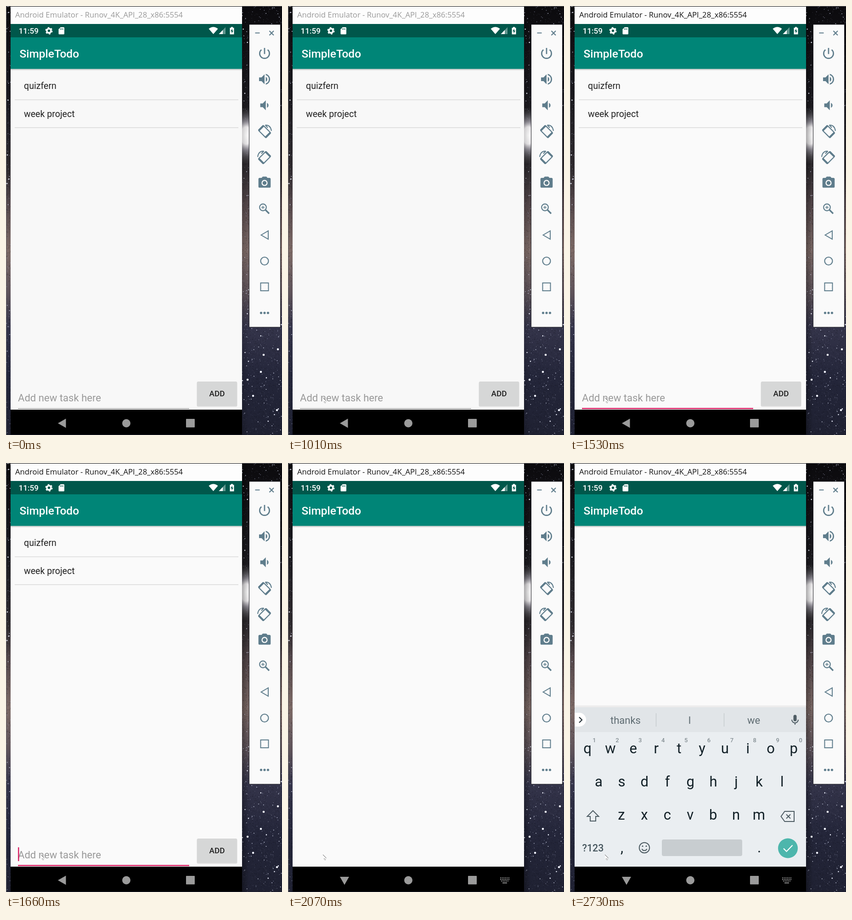
Write an HTML page that moves like this. It is 601x931 px and loops after 8 s.

```html
<!DOCTYPE html>
<html lang="en">
<head>
<meta charset="utf-8">
<title>Todo app in an emulator</title>
<style>
html, body { margin: 0; width: 100%; height: 100%; overflow: hidden; background: #08080c; }
svg { display: block; width: 100vw; height: 100vh; }
text { font-family: Roboto, Arial, sans-serif; white-space: pre; }
.mid { text-anchor: middle; }
.bold { font-weight: 500; }
.line { fill: none; stroke-width: 2.2; }
#title { font: 16.7px "Open Sans", "Noto Sans", sans-serif; }
</style>
</head>
<body>
<svg viewBox="0 0 601 931" xmlns="http://www.w3.org/2000/svg">
  <defs>
    <linearGradient id="sky" x2="0" y2="1">
      <stop offset="0" stop-color="#0b0a0d"/>
      <stop offset=".2" stop-color="#19181d"/>
      <stop offset=".38" stop-color="#2e2a2e"/>
      <stop offset=".46" stop-color="#54474a"/>
      <stop offset=".57" stop-color="#7d6a66"/>
      <stop offset=".67" stop-color="#5d5259"/>
      <stop offset=".75" stop-color="#34344a"/>
      <stop offset=".86" stop-color="#24263a"/>
      <stop offset="1" stop-color="#1f2132"/>
    </linearGradient>
    <radialGradient id="glow">
      <stop offset="0" stop-color="#fff"/>
      <stop offset=".3" stop-color="#f0eef0"/>
      <stop offset=".5" stop-color="#a5a2ac" stop-opacity=".8"/>
      <stop offset="1" stop-color="#555" stop-opacity="0"/>
    </radialGradient>
    <linearGradient id="side">
      <stop offset="0" stop-color="#000" stop-opacity=".3"/>
      <stop offset="1" stop-color="#000" stop-opacity="0"/>
    </linearGradient>
    <linearGradient id="drop" x2="0" y2="1">
      <stop offset="0" stop-color="#000" stop-opacity=".22"/>
      <stop offset="1" stop-color="#000" stop-opacity="0"/>
    </linearGradient>
    <clipPath id="screen"><path d="M10 39H514V930H10z"/></clipPath>
  </defs>

  <rect width="601" height="931" fill="url(#sky)"/>
  <g id="stars" stroke-linecap="round" fill="none"></g>
  <ellipse cx="523" cy="281" rx="40" ry="62" fill="url(#glow)"/>
  <rect id="shade" x="514" width="15" height="930" fill="url(#side)"/>
  <path d="M.5 931V.5H601" fill="none" stroke="#77777a"/>

  <!-- emulator window -->
  <path d="M10 0H514V930H10z" fill="#000"/>
  <path d="M10 1H514V39H10z" fill="#fdfdfd"/>
  <text id="title" x="20" y="25">Android Emulator - Runov_4K_API_28_x86:5554</text>

  <g clip-path="url(#screen)">
    <rect id="page" x="10" y="39" width="504" height="891"/>
    <g id="content">
      <g font-size="19.6" fill="#222">
        <text x="39" y="180">quizfern</text>
        <text x="39" y="240.500">week project</text>
      </g>
      <path d="M19 203.500H506M19 264H506" stroke="#d9d9d9" stroke-width="1.600"/>
      <text x="26" y="858" font-size="22.100" fill="#999">Add new task here</text>
      <path id="rule" d="M26 873.500H399"/>
      <path id="caret" d="M27.300 834V864" stroke="#d81b60" stroke-width="2.400"/>
      <rect x="415.500" y="815.500" width="88" height="54" rx="3" fill="#000" opacity=".13"/>
      <rect x="416" y="815" width="87" height="52" rx="2.500" fill="#d6d7d7"/>
      <text class="mid bold" x="459.500" y="847" font-size="17.200" fill="#1f1f1f">ADD</text>
    </g>

    <g id="keyboard">
      <rect x="10" y="526" width="504" height="4" fill="#000" opacity=".05"/>
      <path d="M10 530H514V584H10z" fill="#e1e5e8"/>
      <path d="M10 584H514V940H10z" fill="#eaeef1"/>
      <path d="M10 542H20a15 15 0 0 1 0 30H10z" fill="#fff"/>
      <path d="M20 551.500l6 6-6 6" class="line" stroke="#263238"/>
      <path d="M187.500 543V572M335.500 543V572" stroke="#c3c9cc" stroke-width="1.300"/>
      <g class="mid" font-size="22" fill="#5f6c72">
        <text x="121" y="566">thanks</text><text x="260.500" y="566">I</text><text x="400" y="566">we</text>
      </g>
      <g stroke="#4f5d64" fill="none" stroke-width="2">
        <rect x="487.500" y="547.500" width="5" height="12" rx="2.500" fill="#4f5d64"/>
        <path d="M483 557a7 7 0 0 0 14 0M490 564V568"/>
        <path d="M50 754.500L62.500 767H56V777H44V767H37.500z"/>
        <path d="M467.500 756H488V778H467.500L459.500 767zM471 762.500l9 9M480 762.500l-9 9"/>
        <circle cx="162" cy="835" r="11.200"/>
        <path d="M156.500 837.500a6 6 0 0 0 11 0"/>
        <path d="M158 831.500h.1M166 831.500h.1" stroke-width="3.200" stroke-linecap="round"/>
      </g>
      <g id="keys" class="mid" font-size="31" fill="#122027"></g>
      <g id="hints" class="mid bold" font-size="13" fill="#858f94"></g>
      <text class="mid bold" x="50" y="843" font-size="21.500" fill="#46565e">?123</text>
      <rect x="200" y="817" width="175" height="36" rx="4" fill="#c8cdd0"/>
      <circle cx="474.500" cy="836" r="21.500" fill="#4db6ac"/>
      <path d="M465 836.500l6.500 6.500 13-13.500" class="line" stroke="#fff"/>
    </g>

    <!-- bars -->
    <path d="M10 39H514V68H10z" fill="#00574b"/>
    <path d="M10 68H514V136.500H10z" fill="#008577"/>
    <rect x="10" y="136.500" width="504" height="4" fill="url(#drop)"/>
    <text class="bold" x="27.500" y="60" font-size="17.200" fill="#fff">11:59</text>
    <text class="bold" x="29.400" y="112" font-size="24.500" fill="#fff">SimpleTodo</text>
    <g fill="#fff">
      <circle cx="93.500" cy="53.800" r="4.500" fill="none" stroke="#fff" stroke-width="3.600"/>
      <circle cx="93.500" cy="53.800" r="6.500" fill="none" stroke="#fff" stroke-width="3" stroke-dasharray="3.403"/>
      <path d="M119 46H125.500Q127 46 127 47.500V60Q127 61.500 125.500 61.500H116Q114.500 61.500 114.500 60V50.500z"/>
      <path d="M118.500 48.500v3M121.300 48.500v3M124 48.500v3" stroke="#00574b" stroke-width="1.300"/>
      <path d="M441.500 49.500Q451.500 41.500 461.500 49.500L451.500 61z"/>
      <path d="M478 46V61H463.500z" opacity=".38"/>
      <path d="M472 52.300V61H463.500z"/>
      <path d="M490 45.500h4v1.800h2.500V61.500H487.500V47.300H490z"/>
      <path d="M492.700 49l-3.500 6h2.300v4.500l3.500-6h-2.300z" fill="#00574b"/>
    </g>

    <rect id="nav" x="10" y="876" width="504" height="54" fill="#000"/>
    <g id="buttons">
      <path id="back" d="M113 905.500L130.500 895.500V915.500z"/>
      <circle cx="262" cy="905.500" r="9"/>
      <rect x="392" y="896" width="19" height="18.500" rx="1"/>
      <g id="switch" stroke-width="1.900" fill="none">
        <path d="M462 900.500H482M462 904H482M464 907.300H480" stroke-dasharray="2.100 1.500"/>
        <path d="M467 911.300H477"/>
      </g>
    </g>
  </g>

  <!-- side toolbar -->
  <path d="M529.500 40H597.500V697H529.500z" fill="#fafafa" stroke="#1a1a20"/>
  <g id="tools" fill="#5f7d8c" stroke="#5f7d8c" stroke-width="0">
    <path d="M542.500 58.500H552.500M573.500 54l9.500 9.500M583 54l-9.500 9.500" class="line" stroke-width="1.700"/>
    <g id="turn" class="line">
      <g transform="translate(563 272.500) rotate(45)">
        <rect x="-11.500" y="-7.500" width="23" height="15" rx="1.500"/>
        <path d="M-10.500 -7.500V7.500M10.500 -7.500V7.500" stroke-width="4"/>
      </g>
      <path d="M564.500 258.500Q576 257.500 578 271M570 264l-5.500-5.700" stroke-width="2"/>
    </g>
    <use href="#turn" transform="matrix(-1 0 0 1 1126 56.500)"/>
    <circle cx="563" cy="384" r="4.300"/>
    <g class="line">
      <circle cx="559.500" cy="437" r="7.300"/>
      <path d="M556 437h7M559.500 433.500v7" stroke-width="1.600"/>
      <path d="M565 442.500l8 8" stroke-width="3.200"/>
      <path d="M555.500 497L571 488V506z" stroke-width="2"/>
      <circle cx="563" cy="553.500" r="8.500"/>
      <rect x="554.500" y="601" width="17" height="17" stroke-width="2"/>
    </g>
    <circle cx="555.500" cy="666" r="2.600"/><circle cx="563" cy="666" r="2.600"/><circle cx="570.500" cy="666" r="2.600"/>
  </g>

  <g id="cursor">
    <path d="M0 0V10L2 8.500 4 12 6.500 11 5 7.500H8z" fill="#fbfbfb"/>
    <path d="M0 0L7.500 7.500" stroke="#555"/>
    <path d="M2 8.500l3 .2 1.200 2.300-2 .8z" fill="none" stroke="#999" stroke-width=".8"/>
  </g>
</svg>
<script>
const $ = id => document.getElementById(id);
const set = (node, attrs) => {
  for (const key in attrs) node.setAttribute(key, attrs[key]);
};
const add = (parent, name, attrs, text) => {
  const node = document.createElementNS("http://www.w3.org/2000/svg", name);
  set(node, attrs);
  if (text) node.textContent = text;
  return parent.appendChild(node);
};
const show = (id, on) => set($(id), { visibility: on ? "visible" : "hidden" });

// Toolbar icons on a 24-unit grid
const icon = (y, d) => add($("tools"), "path", {
  d, "fill-rule": "evenodd", transform: `translate(563 ${y}) scale(1.33) translate(-12 -12)`
});
icon(103, "M13 3h-2v10h2zM17.8 5.2l-1.400 1.400A7 7 0 1 1 7.600 6.600L6.200 5.200A9 9 0 1 0 17.800 5.200z");
icon(159, "M3 9v6h4l5 5V4L7 9zM16.500 12A4.500 4.500 0 0 0 14 8v8a4.500 4.500 0 0 0 2.500-4zM14 3.200v2.100a7 7 0 0 1 0 13.400v2.100a9 9 0 0 0 0-17.600z");
icon(215.5, "M18.500 12A4.500 4.500 0 0 0 16 8v8a4.500 4.500 0 0 0 2.500-4zM5 9v6h4l5 5V4L9 9z");
icon(383, "M9 2.500L7.200 4.500H4Q2 4.500 2 6.500V18.500Q2 20.500 4 20.500H20Q22 20.500 22 18.500V6.500Q22 4.500 20 4.500H16.800L15 2.500zM12 7.700a5 5 0 1 1 0 10a5 5 0 1 1 0-10z");

// Keyboard letters
const row = (chars, x, y, step = 49.9, parent = $("keys")) =>
  [...chars].forEach((c, i) => add(parent, "text", { x: x + i * step, y }, c));
row("qwertyuiop", 38, 630);
row("asdfghjkl", 62.5, 702);
row("zxcvbnm", 112, 774);
row(",.", 113, 845, 299);
row("1234567890", 53, 606, 49.9, $("hints"));

// Stars in the strips around the window
let seed = 11;
const rand = () => (seed = seed * 16807 % 2147483647) / 2147483647;
const starGroup = (count, width, color) => {
  let d = "";
  for (let i = 0; i < count; i++) {
    const u = rand() * 97;
    d += `M${(u < 10 ? u : u + 504).toFixed(1)} ${(rand() * 931).toFixed(1)}h.01`;
  }
  add($("stars"), "path", { d, stroke: color, "stroke-width": width });
};
starGroup(3000, 1.5, "#0c0c1455");
starGroup(1600, 1.2, "#6a6c8066");
starGroup(420, 1.3, "#8c90a8");
starGroup(150, 1.8, "#c4c8dc");
starGroup(40, 2.6, "#eceffc");
add($("stars"), "path", {
  d: "M555 794h.1M561 757h.1M592 745h.1M526 811h.1M590 877h.1M538 846h.1",
  stroke: "#f4f6ff", "stroke-width": 4.5
});

// Pointer stops: time, x, y
const stops = [[500, 128, 901], [620, 99, 895], [770, 93, 883], [890, 84, 865], [1010, 76, 850]];

function draw(t) {
  const active = t >= 1410;
  const focus = t >= 1530;
  const typing = t >= 1940;
  const turned = t >= 2070;
  const sliding = t >= 2580 && t < 2730;

  set($("title"), { fill: active ? "#111" : "#999" });
  set($("page"), { fill: active ? "#fafafa" : "#f8f8f8" });
  set($("shade"), { opacity: active ? 1 : .5 });

  show("content", !typing);
  show("caret", t >= 1660 && !typing);
  set($("rule"), { stroke: focus ? "#d81b60" : "#7c7c7c", "stroke-width": focus ? 2.5 : 1.2 });

  show("keyboard", t >= 2580);
  set($("keyboard"), { transform: `translate(0 ${sliding ? 52.6 : 0})`, opacity: sliding ? .64 : 1 });

  const angle = turned ? -90 : typing ? -45 : 0;
  set($("nav"), { opacity: sliding ? .45 : 1 });
  set($("buttons"), { fill: sliding ? "#d6d6d6" : "#9b9b9b" });
  set($("back"), { transform: `translate(${turned ? "1 1" : "0 0"}) rotate(${angle} 122 905.5)` });
  set($("switch"), { stroke: sliding ? "#d0d0d0" : "#9b9b9b", opacity: turned ? 1 : .5 });
  show("switch", typing);

  const stop = stops.filter(s => s[0] <= t).pop();
  show("cursor", stop);
  if (stop) set($("cursor"), { transform: `translate(${stop[1]} ${stop[2]})` });
}

let start;
function tick(now) {
  start ??= now;
  draw((now - start) % 8000);
  requestAnimationFrame(tick);
}
draw(0);
requestAnimationFrame(tick);
</script>
</body>
</html>
```
